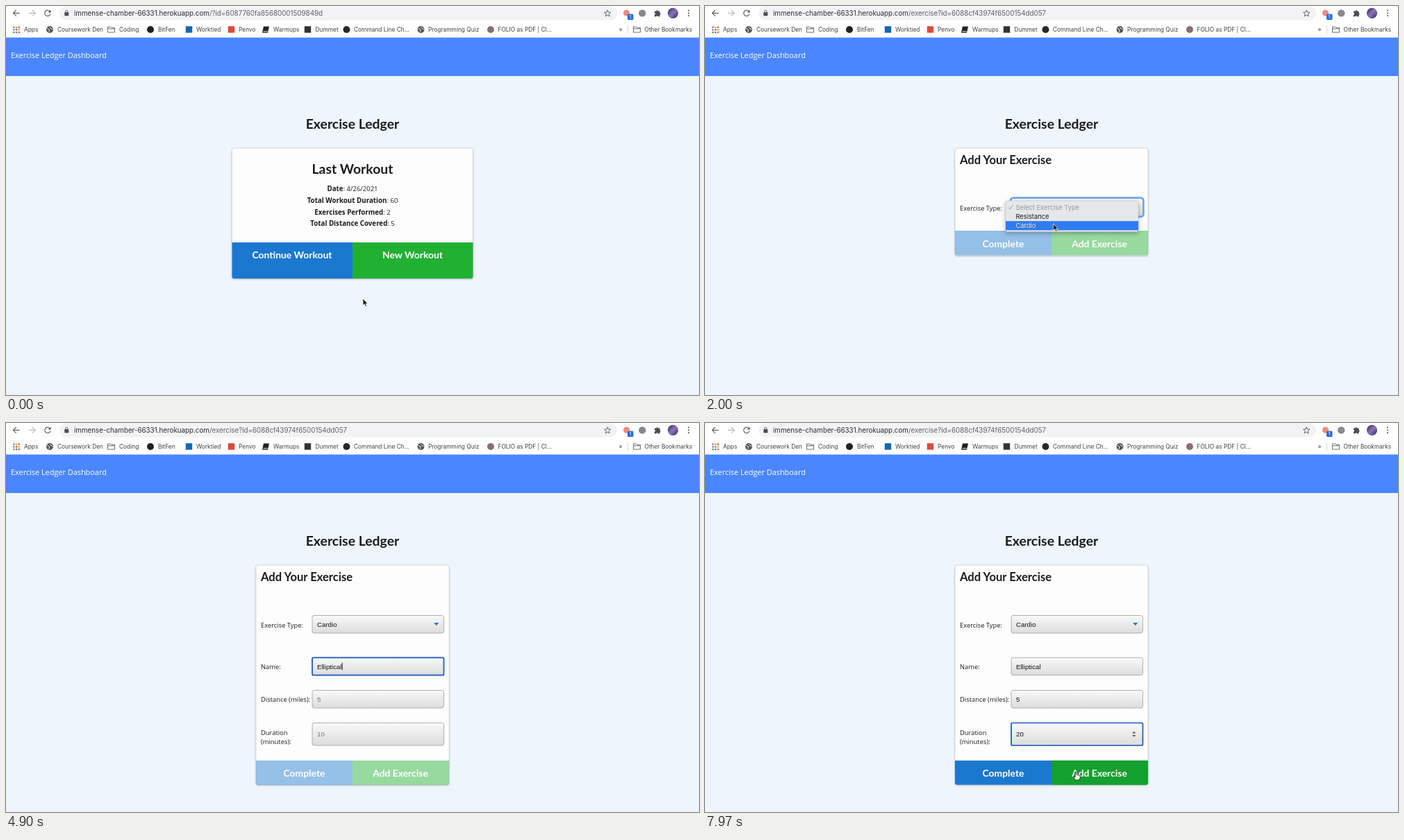
An HTML page that plays this animation: 998 px wide and 561 px high, repeating every 8000 ms.

```html
<!DOCTYPE html>
<html lang="en">
<head>
<meta charset="utf-8">
<title>Exercise Ledger</title>
<style>
  html, body { margin: 0; width: 100%; height: 100%; overflow: hidden; background: #eef5fd; }
  svg { display: block; width: 100vw; height: 100vh; }
  text { white-space: pre; fill: #1b1c1d; }
  .ui { font-family: Inter, sans-serif; }
  .url { font-size: 9.8px; fill: #2c2e31; }
  .marks text { font-size: 8.35px; fill: #3c4043; }
  .head { font: 700 19.4px Lato, sans-serif; text-anchor: middle; }
  .sub { font: 700 16.6px Lato, sans-serif; }
  .btn { font: 700 13.9px Lato, sans-serif; text-anchor: middle; fill: #fff; }
  .stat { font: 9.5px "Open Sans", sans-serif; text-anchor: middle; }
  .stat tspan { font-size: 9.75px; font-weight: 700; }
  .label { font: 9.4px "Open Sans", sans-serif; }
  .value { font: 9.7px "Liberation Sans", sans-serif; fill: #111; }
  .value.hint { fill: #757575; }
  .menu text { font-size: 9.3px; }
  .card { fill: #fdfdfd; stroke: #cfd2d4; stroke-width: .7; filter: drop-shadow(0 1px 1.3px rgba(0,0,0,.25)); }
  .field { fill: url(#fieldFill); stroke: #a8a8a8; stroke-width: .9; }
  .focus { fill: none; stroke: #1c58c0; stroke-width: 1.7; }
  .blue { fill: #1b78cf; }
  .green { fill: #20b133; }
  .hover { fill: #14a02e; }
  .line { fill: none; stroke: #5f6368; stroke-width: 1.2; }
  .dark { fill: #4b4f54; }

  #pointer { animation: travel 8s ease-in-out infinite; }
  #foot { animation: drop 8s step-end infinite, enable 8s linear infinite; }
  @keyframes travel {
    0%, 1% { transform: translate(514px, 422px); }
    5.5%, 13.5% { transform: translate(529px, 366px); }
    18.5%, 20% { transform: translate(520px, 291px); }
    24%, 27% { transform: translate(501.5px, 314px); }
    33%, 62.9% { transform: translate(477.5px, 349.5px); }
    67%, 75.5% { transform: translate(474px, 398px); }
    79% { transform: translate(472px, 441px); }
    80.5%, 93% { transform: translate(472px, 447px); }
    98.5%, 100% { transform: translate(534px, 503px); }
  }
  @keyframes drop {
    0% { transform: translate(360px, 324px); }
    28.5%, 100% { transform: translate(360px, 486.5px); }
  }
  @keyframes enable {
    0%, 87.5% { opacity: .46; }
    88.75%, 100% { opacity: 1; }
  }
</style>
</head>
<body>
<svg viewBox="0 0 998 561" preserveAspectRatio="none">
  <defs>
    <linearGradient id="fieldFill" x1="0" y1="0" x2="0" y2="1">
      <stop offset="0" stop-color="#f9f9f9"/><stop offset="1" stop-color="#dcdcdc"/>
    </linearGradient>
    <linearGradient id="avatar" x1="0" y1="0" x2="1" y2="1">
      <stop offset="0" stop-color="#2c1f52"/><stop offset=".5" stop-color="#8a76b4"/><stop offset="1" stop-color="#30205a"/>
    </linearGradient>
  </defs>

  <rect width="998" height="561" fill="#eef5fd"/>
  <rect width="998" height="45.5" fill="#fff"/>
  <rect y="45.5" width="998" height="55.5" fill="#4a86fe"/>
  <text x="7" y="74.5" style="font:10.9px 'Open Sans',sans-serif;fill:#fff">Exercise Ledger Dashboard</text>

  <!-- browser toolbar -->
  <g class="ui">
    <path class="line" d="M19.5 10.3H10.5M14.7 6L10.4 10.3L14.7 14.6"/>
    <path class="line" style="stroke:#b9bcc0" d="M33 10.3H42M37.8 6L42.1 10.3L37.8 14.6"/>
    <path class="line" d="M63 7.4A4.2 4.2 0 1 0 64 11.4"/><path class="dark" d="M64.5 5.5V9.5H60.5Z"/>
    <rect x="77" y=".5" width="803" height="20" rx="10" fill="#f1f3f4"/>
    <rect class="dark" x="84.3" y="9" width="6" height="5.2" rx=".8"/>
    <path class="line" style="stroke-width:1" d="M85.7 9V7.8A1.6 1.6 0 0 1 88.9 7.8V9"/>
    <text class="url" x="98" y="13.8" data-on="0-800">immense-chamber-66331.herokuapp.com<tspan fill="#5f6368">/?id=6087760fa85680001509849d</tspan></text>
    <text class="url" x="98" y="13.8" data-on="800-8000">immense-chamber-66331.herokuapp.com<tspan fill="#5f6368">/exercise?id=6088cf43974f6500154dd057</tspan></text>
    <path class="line" style="stroke-width:1" d="M866.3 5.8L867.6 9L871 9.2L868.4 11.4L869.2 14.8L866.3 13L863.4 14.8L864.2 11.4L861.6 9.2L865 9Z"/>
    <circle cx="893.5" cy="10" r="4.5" fill="#ee8a80"/>
    <rect x="895" y="11.5" width="8.5" height="8.5" rx="1.5" fill="#2a6fdc"/>
    <text x="897.7" y="18.3" style="font-size:6.5px;fill:#fff">1</text>
    <circle cx="916.3" cy="10.4" r="5.2" fill="#85888c"/>
    <path class="dark" d="M934 7.5H936.3A1.6 1.6 0 0 1 939.4 7.5H941.6V10A1.6 1.6 0 0 1 941.6 13V15.2H939.2A1.5 1.5 0 0 0 936.4 15.2H934V12.7A1.5 1.5 0 0 0 934 9.8Z"/>
    <circle cx="960.5" cy="10.3" r="7.6" fill="url(#avatar)"/>
    <g class="dark"><circle cx="983" cy="6.5" r="1"/><circle cx="983" cy="10.3" r="1"/><circle cx="983" cy="14.1" r="1"/></g>
  </g>
  <g id="marks" class="ui marks"></g>

  <text class="head" x="499" y="176.5">Exercise Ledger</text>

  <!-- last workout -->
  <g data-on="0-820">
    <rect class="card" x="325.5" y="205" width="347" height="188" rx="3"/>
    <text class="head" x="499" y="242">Last Workout</text>
    <text class="stat" x="499" y="267.4"><tspan>Date</tspan>: 4/26/2021</text>
    <text class="stat" x="499" y="284"><tspan>Total Workout Duration</tspan>: 60</text>
    <text class="stat" x="499" y="300.6"><tspan>Exercises Performed</tspan>: 2</text>
    <text class="stat" x="499" y="317.2"><tspan>Total Distance Covered</tspan>: 5</text>
    <path class="blue" d="M325.5 341H499V393H328.5A3 3 0 0 1 325.5 390Z"/>
    <path class="green" d="M499 341H672.5V390A3 3 0 0 1 669.5 393H499Z"/>
    <path class="hover" data-on="260-820" d="M499 341H672.5V390A3 3 0 0 1 669.5 393H499Z"/>
    <text class="btn" x="412" y="364.2">Continue Workout</text>
    <text class="btn" x="585.5" y="364.2">New Workout</text>
  </g>

  <!-- exercise form -->
  <g data-on="820-8000">
    <rect class="card" x="360" y="205" width="278" height="154.5" rx="3" data-on="820-2280"/>
    <rect class="card" x="360" y="205" width="278" height="316.5" rx="3" data-on="2280-8000"/>
    <text class="sub" x="367" y="228.4">Add Your Exercise</text>
    <text class="label" x="367" y="294.5">Exercise Type:</text>
    <rect class="field" x="441" y="277.5" width="189.5" height="25.5" rx="3"/>
    <path class="blue" d="M616.3 288H623.3L619.8 292.2Z"/>
    <rect class="focus" style="stroke:#6ca7ee;stroke-width:2.6" x="440" y="276.5" width="191.5" height="27.5" rx="4" data-on="1520-2740"/>
    <text class="value" x="448" y="293.8" data-on="820-2200">Select Exercise Type</text>
    <text class="value" x="448" y="293.8" data-on="2200-8000">Cardio</text>
    <g id="inputs" data-on="2280-8000">
      <text class="label" x="367" y="355.4">Name:</text>
      <text class="label" x="367" y="402.4">Distance (miles):</text>
      <text class="label" x="367" y="449.6">Duration</text>
      <text class="label" x="367" y="462.6">(minutes):</text>
    </g>
    <g id="foot">
      <path class="blue" d="M0 0H139V35.3H3A3 3 0 0 1 0 32.3Z"/>
      <path class="green" d="M139 0H278V32.3A3 3 0 0 1 275 35.3H139Z"/>
      <path class="hover" data-on="7740-8000" d="M139 0H278V32.3A3 3 0 0 1 275 35.3H139Z"/>
      <text class="btn" x="69.5" y="23.5">Complete</text>
      <text class="btn" x="208" y="23.5">Add Exercise</text>
    </g>
    <g class="ui menu" data-on="1520-2200">
      <rect x="433" y="281" width="191" height="44.5" rx="3" fill="#e5e8e8" stroke="#c3c6c8" stroke-width=".5" style="filter:drop-shadow(0 2px 3px rgba(0,0,0,.3))"/>
      <rect x="433" y="297" width="191" height="13.2" fill="#2f7cf1" data-on="1660-1840"/>
      <rect x="433" y="310.2" width="191" height="13.2" fill="#2f7cf1" data-on="1840-2200"/>
      <path class="line" style="stroke:#979a9b;stroke-width:1" d="M437.3 290.5L439.2 293L443.3 287"/>
      <text x="447.5" y="293.6" style="fill:#979a9b">Select Exercise Type</text>
      <text x="447.5" y="306.8">Resistance</text>
      <text x="447.5" y="306.8" style="fill:#fff" data-on="1660-1840">Resistance</text>
      <text x="447.5" y="320">Cardio</text>
      <text x="447.5" y="320" style="fill:#fff" data-on="1840-2200">Cardio</text>
    </g>
  </g>

  <g id="pointer">
    <path data-on="0-260,1120-2560,5130-5250,6120-6240,7600-7740" fill="#111" stroke="#fff" stroke-width=".8"
      d="M0 0V9.8L2.2 7.8L3.8 11.4L5.5 10.6L4 7.2H7Z"/>
    <path data-on="260-1120,7740-8000" fill="#fff" stroke="#222" stroke-width=".9" stroke-linejoin="round"
      d="M-.9 .9Q0 -.4 1 .9V4.3Q2.1 3.6 2.8 4.7Q3.8 4.1 4.5 5.2Q6.2 4.8 6.2 6.6V8.5L5 12H-.2L-3 8.2Q-3.4 6.6 -1.9 7L-.9 7.9Z"/>
    <path data-on="2560-3300,5030-5130,5250-5900,6040-6120,6240-7000,7440-7600" class="line" style="stroke:#222;stroke-width:.9"
      d="M-2.3 -5.5Q0 -5.5 0 -4V4Q0 5.5 -2.3 5.5M2.3 -5.5Q0 -5.5 0 -4M0 4Q0 5.5 2.3 5.5M-1.2 1.7H1.2"/>
  </g>
</svg>

<script>
const LOOP = 8000;
const $ = id => document.getElementById(id);

function add(parent, tag, attrs = {}, text = '') {
  const el = document.createElementNS(parent.namespaceURI, tag);
  for (const key in attrs) el.setAttribute(key, attrs[key]);
  el.textContent = text;
  return parent.appendChild(el);
}

const icons = {
  apps(g, x) {
    const colors = ['#e2574c', '#e5a32f', '#4c9c5a', '#4a83e0'];
    for (let i = 0; i < 9; i++)
      add(g, 'rect', { x: x - 4.8 + i % 3 * 3.7, y: 29.5 + Math.floor(i / 3) * 3.7, width: 2.3, height: 2.3, fill: colors[i % 4] });
  },
  globe(g, x) {
    add(g, 'circle', { cx: x, cy: 34, r: 4.9, fill: '#505459' });
    add(g, 'path', { d: `M${x - 3.8} 32.2L${x - .5} 34.2L${x - 1} 37.5M${x} 30.4L${x + 1.5} 32.5L${x + 4} 33.5`, stroke: '#fff', fill: 'none' });
  },
  folder(g, x) {
    add(g, 'path', { d: `M${x - 5} 30H${x - 1}L${x + .3} 31.3H${x + 5}V38H${x - 5}ZM${x - 5} 32.8H${x + 5}`, fill: 'none', stroke: '#6a6e73' });
  },
  book(g, x) {
    add(g, 'path', { d: `M${x - 3} 29.5H${x + 5}L${x + 3} 38.5H${x - 5}Z`, fill: '#222' });
    add(g, 'path', { d: `M${x - 3.5} 36.5H${x + 2.7}`, stroke: '#fff', 'stroke-width': .8 });
  },
  dot(g, x, fill) { add(g, 'circle', { cx: x, cy: 34, r: 5, fill }); },
  square(g, x, fill) { add(g, 'rect', { x: x - 4.7, y: 29.2, width: 9.4, height: 9.4, fill }); }
};

const bookmarks = [
  ['apps', 15, 26, 'Apps'],
  ['globe', 63, 74, 'Coursework Den'],
  ['folder', 151.5, 163, 'Coding'],
  ['dot', 208, 219, 'BitFen', '#1d2024'],
  ['square', 263.5, 274, 'Worktied', '#1567ae'],
  ['square', 324.5, 335, 'Penvo', '#dc4a3d'],
  ['book', 374, 385, 'Warmups'],
  ['square', 434.5, 445.5, 'Dummet', '#333'],
  ['dot', 490.5, 501, 'Command Line Ch...', '#26282c'],
  ['globe', 597.5, 608, 'Programming Quiz'],
  ['dot', 698, 708.5, 'FOLIO as PDF | Cl...', '#84706f'],
  ['folder', 908.5, 919.5, 'Other Bookmarks']
];
for (const [icon, x, textX, name, color] of bookmarks) {
  icons[icon]($('marks'), x, color);
  add($('marks'), 'text', { x: textX, y: 37 }, name);
}
add($('marks'), 'text', { x: 882.8, y: 36.8 }, '»');
add($('marks'), 'path', { d: 'M895.5 28V40', stroke: '#d5d7da' });

// keys: time of each keystroke; spin: when the number arrows show
const fields = [
  { y: 338.3, h: 25.4, hint: 'Running', value: 'Elliptical', focus: [2740, 5400],
    keys: [...'Elliptical'].map((_, i) => 3300 + i * 150) },
  { y: 385.5, h: 25.5, hint: '5', value: '5', focus: [5400, 6540], keys: [5900], spin: '5260-6540' },
  { y: 432.5, h: 32.5, hint: '10', value: '20', focus: [6540, LOOP], keys: [7000, 7300], spin: '6250-8000' }
];
for (const f of fields) {
  const g = $('inputs'), mid = f.y + f.h / 2, box = { x: 441, y: f.y, width: 189.5, height: f.h };
  add(g, 'rect', { ...box, class: 'field', rx: 3 });
  add(g, 'rect', { ...box, class: 'focus', rx: 2, 'data-on': f.focus.join('-') });
  if (f.spin)
    add(g, 'path', { class: 'dark', 'data-on': f.spin,
      d: `M615.2 ${mid - 1.2}H620.4L617.8 ${mid - 4}ZM615.2 ${mid + 1.2}H620.4L617.8 ${mid + 4}Z` });
  f.text = add(g, 'text', { x: 448, y: mid + 3.5 });
  f.caret = add(g, 'rect', { y: mid - 5.3, width: .9, height: 10.6, fill: '#111' });
}

const timed = [...document.querySelectorAll('[data-on]')].map(el => ({
  el, spans: el.dataset.on.split(',').map(s => s.split('-').map(Number))
}));
const within = (t, [from, to]) => t >= from && t < to;
const show = (el, on) => { el.style.display = on ? '' : 'none'; };

function drawField(f, t) {
  const pressed = f.keys.filter(k => k <= t);
  f.text.textContent = pressed.length ? f.value.slice(0, pressed.length) : f.hint;
  f.text.setAttribute('class', pressed.length ? 'value' : 'value hint');
  const lastAction = Math.max(f.focus[0], ...pressed);
  const lit = within(t, f.focus) && Math.floor((t - lastAction) / 500) % 2 === 0;
  show(f.caret, lit);
  if (lit) f.caret.setAttribute('x', 448.2 + (pressed.length ? f.text.getComputedTextLength() : 0));
}

// The pointer's CSS animation is the shared clock.
const clock = $('pointer').getAnimations()[0];
function render() {
  const t = (clock.currentTime || 0) % LOOP;
  for (const { el, spans } of timed) show(el, spans.some(s => within(t, s)));
  fields.forEach(f => drawField(f, t));
  requestAnimationFrame(render);
}
render();
</script>
</body>
</html>
```
